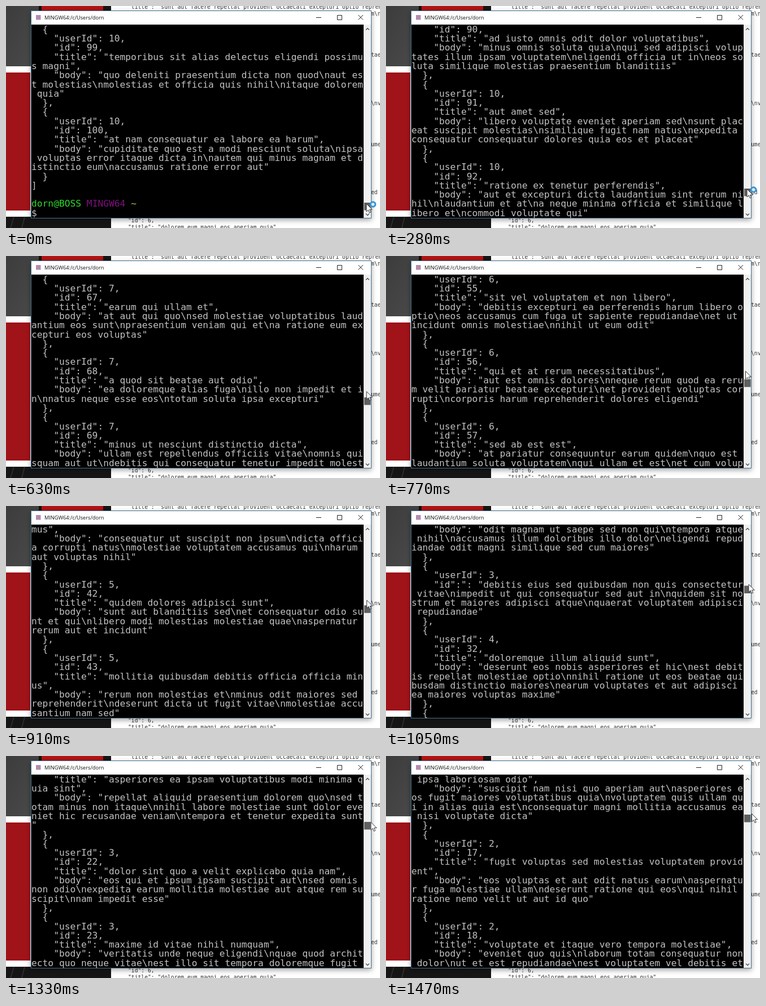
These frames come from a looping animation (662x394 px, 1540 ms). An HTML page:

```html
<!DOCTYPE html>
<html lang="en">
<head>
<meta charset="utf-8">
<title>Terminal scroll</title>
<style>
  html, body { margin: 0; width: 100%; height: 100%; overflow: hidden; background: #fff; }
  svg { display: block; width: 662px; height: 394px; }
  text { white-space: pre; }
  .mono { font-family: "DejaVu Sans Mono", monospace; }
  #page { font-size: 9.7px; fill: #333; }
  #rows { font-size: 16.25px; fill: #c2c2c2; }
  #name { font: 9.2px "Open Sans", sans-serif; fill: #111; }
</style>
</head>
<body>
<svg viewBox="0 0 662 394" xmlns="http://www.w3.org/2000/svg">
  <defs>
    <linearGradient id="grey" x2="1" y2="1"><stop stop-color="#3c3c3c"/><stop offset="1" stop-color="#4b4b4b"/></linearGradient>
    <filter id="shade" x="-10%" y="-10%" width="120%" height="120%">
      <feDropShadow dx="0" dy="3" stdDeviation="5" flood-opacity=".36"/>
    </filter>
  </defs>
  <rect width="662" height="394" fill="#fff"/>
  <rect width="58" height="107" fill="url(#grey)"/>
  <rect x="58" width="5" height="20" fill="#181010"/>
  <rect x="63" width="109" height="20" fill="#b01414"/>
  <rect x="172" width="14" height="20" fill="#151515"/>
  <rect y="118" width="43" height="245" fill="#a01319"/>
  <rect y="374" width="186" height="20" fill="#151515"/>
  <path d="M8 394l6-20M28 394l5-20" stroke="#2c2c2c" stroke-width="2"/>
  <g id="page" class="mono">
    <text x="216" y="5">"title": "sunt aut facere repellat provident occaecati excepturi optio repreh</text>
    <text x="646" y="17">m\n</text>
    <text x="646" y="90">tae</text>
    <text x="646" y="176">\nv</text>
    <text x="646" y="249">ume</text>
    <text x="646" y="334">ed</text>
    <text x="216" y="384">"id": 6,</text>
    <text x="216" y="395.5">"title": "dolorem eum magni eos aperiam quia",</text>
  </g>
  <rect x="44" y="8" width="603" height="369" fill="#fff" filter="url(#shade)"/>
  <rect x="44.5" y="33" width="589" height="343.5" fill="#000"/>
  <rect x="633" y="33" width="13.5" height="343.5" fill="#f0f0f0"/>
  <rect x="44.5" y="8.5" width="602" height="368" fill="none" stroke="#46718c"/>
  <rect x="53" y="16" width="8.5" height="8.5" fill="#b58bb0"/>
  <text id="name" x="68" y="23.5">MINGW64:/c/Users/dorn</text>
  <path d="M549 20.5h9M586.5 16.5h8v8h-8zM623.5 16l8.5 8.5M632 16l-8.5 8.5" fill="none" stroke="#222"/>
  <path d="M637 42.5l3-3 3 3M637 368.5l3 3 3-3" fill="none" stroke="#505050" stroke-width="1.3"/>
  <g id="rows" class="mono"></g>
  <rect id="thumb" x="634" width="11.5" height="13.5" fill="#606060"/>
  <g id="cursor">
    <circle id="busy" cx="11.5" cy="1" r="4.3" fill="#d4ecf8" stroke="#3b94d2" stroke-width="3"/>
    <path d="M0 0v14l3.2-3 2.2 5 2.3-1-2.2-4.8h4.6z" fill="#fff" stroke="#222" stroke-width=".9"/>
  </g>
</svg>
<script>
const COLS = 60, ROWS = 21, STEP = 70, COUNT = 22;
const PROMPT = 'dorn@BOSS MINGW64 ~';
const $ = id => document.getElementById(id);

// id|title|body
const known = String.raw`
16|sint suscipit perspiciatis velit dolorum rerum ipsa laboriosam odio|suscipit nam nisi quo aperiam aut\nasperiores eos fugit maiores voluptatibus quia\nvoluptatem quis ullam qui in alias quia est\nconsequatur magni mollitia accusamus ea nisi voluptate dicta
17|fugit voluptas sed molestias voluptatem provident|eos voluptas et aut odit natus earum\naspernatur fuga molestiae ullam\ndeserunt ratione qui eos\nqui nihil ratione nemo velit ut aut id quo
18|voluptate et itaque vero tempora molestiae|eveniet quo quis\nlaborum totam consequatur non dolor\nut et est repudiandae\nest voluptatem vel debitis et magnam
21|asperiores ea ipsam voluptatibus modi minima quia sint|repellat aliquid praesentium dolorem quo\nsed totam minus non itaque\nnihil labore molestiae sunt dolor eveniet hic recusandae veniam\ntempora et tenetur expedita sunt
22|dolor sint quo a velit explicabo quia nam|eos qui et ipsum ipsam suscipit aut\nsed omnis non odio\nexpedita earum mollitia molestiae aut atque rem suscipit\nnam impedit esse
23|maxime id vitae nihil numquam|veritatis unde neque eligendi\nquae quod architecto quo neque vitae\nest illo sit tempora doloremque fugit quod\net et vel beatae sequi ullam sed tenetur perspiciatis
29|iusto eius quod necessitatibus culpa ea|odit magnam ut saepe sed non qui\ntempora atque nihil\naccusamus illum doloribus illo dolor\neligendi repudiandae odit magni similique sed cum maiores
30||debitis eius sed quibusdam non quis consectetur vitae\nimpedit ut qui consequatur sed aut in\nquidem sit nostrum et maiores adipisci atque\nquaerat voluptatem adipisci repudiandae
32|doloremque illum aliquid sunt|deserunt eos nobis asperiores et hic\nest debitis repellat molestiae optio\nnihil ratione ut eos beatae quibusdam distinctio maiores\nearum voluptates et aut adipisci ea maiores voluptas maxime
55|sit vel voluptatem et non libero|debitis excepturi ea perferendis harum libero optio\neos accusamus cum fuga ut sapiente repudiandae\net ut incidunt omnis molestiae\nnihil ut eum odit
56|qui et at rerum necessitatibus|aut est omnis dolores\nneque rerum quod ea rerum velit pariatur beatae excepturi\net provident voluptas corrupti\ncorporis harum reprehenderit dolores eligendi
57|sed ab est est|at pariatur consequuntur earum quidem\nquo est laudantium soluta voluptatem\nqui ullam et est\net cum voluptas voluptatum repellat est
78|quam voluptatibus rerum veritatis|nobis facilis odit tempore cupiditate quia\nassumenda doloribus rerum qui ea\nillum et qui totam\naut veniam repellendus
79|pariatur consequatur quia magnam autem omnis non amet|libero accusantium et et facere incidunt sit dolorem\nnon excepturi qui quia sed laudantium\nquisquam molestiae ducimus est\nofficiis esse molestiae iste et quos
90|ad iusto omnis odit dolor voluptatibus|minus omnis soluta quia\nqui sed adipisci voluptates illum ipsam voluptatem\neligendi officia ut in\neos soluta similique molestias praesentium blanditiis
91|aut amet sed|libero voluptate eveniet aperiam sed\nsunt placeat suscipit molestias\nsimilique fugit nam natus\nexpedita consequatur consequatur dolores quia eos et placeat
92|ratione ex tenetur perferendis|aut et excepturi dicta laudantium sint rerum nihil\nlaudantium et at\na neque minima officia et similique libero et\ncommodi voluptate qui
99|temporibus sit alias delectus eligendi possimus magni|quo deleniti praesentium dicta non quod\naut est molestias\nmolestias et officia quis nihil\nitaque dolorem quia
100|at nam consequatur ea labore ea harum|cupiditate quo est a modi nesciunt soluta\nipsa voluptas error itaque dicta in\nautem qui minus magnam et distinctio eum\naccusamus ratione error aut`
  .trim().split('\n').map(l => l.split('|'));

const posts = new Map(known.map(([id, title, body]) => [+id, [title, body]]));
const words = known.flatMap(p => p[2].split(/\\n| /));

// Seeded filler for the posts that rush past
function filler(id) {
  let seed = id * 7919 + 17;
  const rnd = n => (seed = (seed * 16807) % 2147483647) % n;
  const phrase = n => Array.from({ length: n }, () => words[rnd(words.length)]).join(' ');
  return [phrase(4 + rnd(3)),
    Array.from({ length: 4 }, () => phrase(4 + rnd(3))).join('\\n')];
}

const lines = [], start = {};
const put = s => { for (let i = 0; i < s.length; i += COLS) lines.push(s.slice(i, i + COLS)); };

for (let id = 16; id <= 100; id++) {
  if (id === 31) continue;
  const [title, body] = posts.get(id) || filler(id);
  start[id] = lines.length;
  put('  {');
  put(`    "userId": ${Math.ceil(id / 10)},`);
  if (title) {
    put(`    "id": ${id},`);
    put(`    "title": "${title}",`);
    put(`    "body": "${body}"`);
  } else {
    put(`    "id":": "${body}"`);  // garbled terminal output
  }
  put(id < 100 ? '  },' : '  }');
}
lines.push(']', '', PROMPT, '$');

// step, top line, thumb y, cursor x, cursor y
const keys = [
  [0, start[99], 349, 638, 351],
  [4, start[90] + 2, 324, 639, 325],
  [7, start[78] - 1, 280.5, 640, 276.5],
  [11, start[55] + 1, 219, 636.5, 204.5],
  [15, start[32] - 11, 141.5, 642, 139],
  [19, start[22] - 7, 117, 646, 117.5],
  [21, start[17] - 6, 104, 647.5, 102.5]
];

const slope = (i, c) => (keys[i + 1][c] - keys[i][c]) / (keys[i + 1][0] - keys[i][0]);
function tangent(i, c) {
  if (i === 0) return slope(0, c);
  if (i === keys.length - 1) return slope(i - 1, c);
  const a = slope(i - 1, c), b = slope(i, c);
  return a * b > 0 ? 2 * a * b / (a + b) : 0;
}
// Monotone cubic between keys
function value(step, c) {
  let i = 0;
  while (i < keys.length - 2 && step >= keys[i + 1][0]) i++;
  const a = keys[i], b = keys[i + 1], h = b[0] - a[0], u = (step - a[0]) / h, v = 1 - u;
  return a[c] * v * v * (1 + 2 * u) + b[c] * u * u * (3 - 2 * u)
    + h * u * v * (v * tangent(i, c) - u * tangent(i + 1, c));
}

function add(parent, tag, attrs, text = '') {
  const el = document.createElementNS('http://www.w3.org/2000/svg', tag);
  for (const k in attrs) el.setAttribute(k, attrs[k]);
  el.textContent = text;
  return parent.appendChild(el);
}
const rows = Array.from({ length: ROWS }, (_, i) =>
  add($('rows'), 'text', { x: 45, y: 46.7 + i * 16.3 }));

function setRow(el, line) {
  el.textContent = line === PROMPT ? '' : line;
  if (line !== PROMPT) return;
  const [user, host, dir] = line.split(' ');
  add(el, 'tspan', { fill: '#2fdc2f' }, user + ' ');
  add(el, 'tspan', { fill: '#80107f' }, host + ' ');
  add(el, 'tspan', { fill: '#bcbc48' }, dir);
}

function draw(step) {
  const top = Math.round(value(step, 1));
  rows.forEach((el, i) => setRow(el, lines[top + i] || ''));
  $('thumb').setAttribute('y', value(step, 2));
  $('cursor').setAttribute('transform', `translate(${value(step, 3)} ${value(step, 4)})`);
  $('busy').setAttribute('visibility', step < 9 ? 'visible' : 'hidden');
}

let last = 0;
const origin = performance.now();
function tick() {
  const step = Math.floor((performance.now() - origin) / STEP) % COUNT;
  if (step !== last) draw(last = step);
  requestAnimationFrame(tick);
}
draw(0);
requestAnimationFrame(tick);
</script>
</body>
</html>
```
